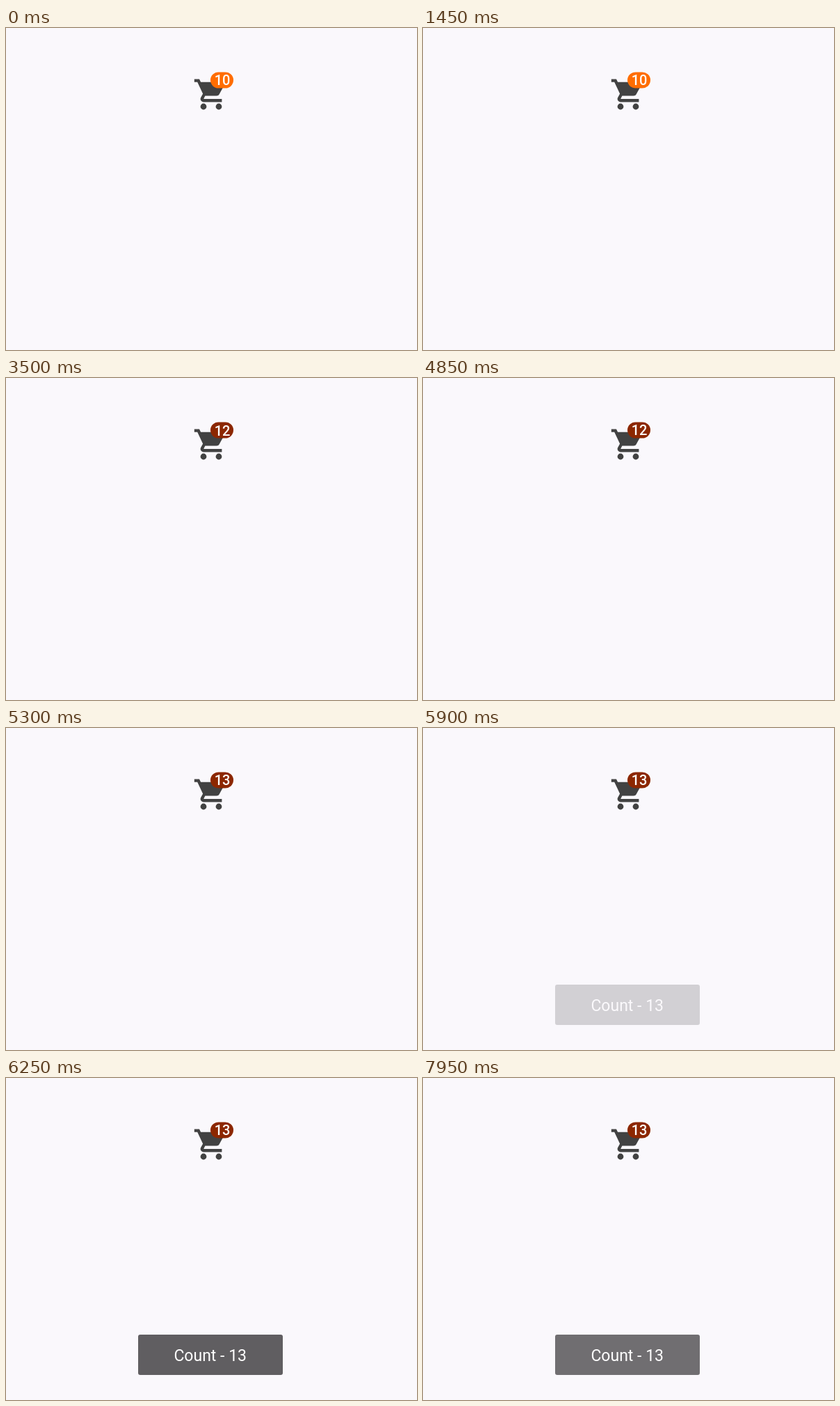
These frames come from a looping animation (591 px wide and 463 px high, 8 s). An HTML page:

```html
<!DOCTYPE html>
<html lang="en">
<head>
<meta charset="utf-8">
<title>Cart badge</title>
<style>
  html, body { margin: 0; width: 100%; height: 100%; overflow: hidden; background: #faf8fc; }
  svg { display: block; }
  text { font-family: Roboto, sans-serif; fill: #fff; text-anchor: middle; }
  #digits text { font-size: 20px; font-weight: 500; }
  #toast text { font-size: 23px; }
</style>
</head>
<body>
<svg width="591" height="463" viewBox="0 0 591 463">
  <defs>
    <clipPath id="pillClip"><rect x="294" y="63.5" width="33" height="23" rx="11.5"/></clipPath>
  </defs>
  <g transform="translate(268.6 69) scale(2.2)" fill="#424242">
    <circle cx="7" cy="20" r="2"/>
    <circle cx="17" cy="20" r="2"/>
    <path d="M1 2v2h2l3.6 7.59-1.35 2.45c-.16.28-.25.61-.25.96 0 1.1.9 2 2 2h12v-2H7.42c-.14 0-.25-.11-.25-.25l.03-.12.9-1.63h7.45c.75 0 1.41-.41 1.75-1.03l3.58-6.49c.08-.14.12-.31.12-.48 0-.55-.45-1-1-1H5.21l-.94-2z"/>
  </g>
  <rect id="pill" x="294" y="63.5" width="33" height="23" rx="11.5"/>
  <g id="digits" clip-path="url(#pillClip)">
    <text id="leaving" x="311"></text>
    <text id="arriving" x="311"></text>
  </g>
  <g id="toast">
    <rect x="190" y="369" width="208" height="58" rx="3" fill="#605e61"/>
    <text x="293.7" y="407">Count - 13</text>
  </g>
</svg>
<script>
  const LOOP = 8000, STEP = 50;
  const BASELINE = 82.4, TRAVEL = 24, SLIDE = 450;
  const FIRST_COUNT = 10, DARK_FROM = 12;
  const increments = [1990, 3090, 4840];
  const $ = id => document.getElementById(id);
  const progress = (t, start, length) => Math.min(1, Math.max(0, (t - start) / length));
  const easeInOut = p => (1 - Math.cos(Math.PI * p)) / 2;
  const easeOut = p => 1 - (1 - p) ** 2;

  function place(id, value, y) {
    $(id).textContent = value;
    $(id).setAttribute('y', y);
  }

  function draw(t) {
    const passed = increments.filter(start => t >= start);
    const count = FIRST_COUNT + passed.length;
    const slide = passed.length ? easeInOut(progress(t, passed.at(-1), SLIDE)) : 1;
    place('leaving', slide < 1 ? count - 1 : '', BASELINE - TRAVEL * slide);
    place('arriving', count, BASELINE + TRAVEL * (1 - slide));
    $('pill').setAttribute('fill', count >= DARK_FROM ? '#8c2700' : '#ff6d00');
    const shown = easeOut(progress(t, 5845, 400));
    const hidden = easeOut(progress(t, 7927, 400));
    $('toast').setAttribute('opacity', shown - hidden);
  }

  function tick() {
    const t = performance.now() % LOOP;
    draw(Math.floor(t / STEP) * STEP);
    requestAnimationFrame(tick);
  }
  tick();
</script>
</body>
</html>
```
